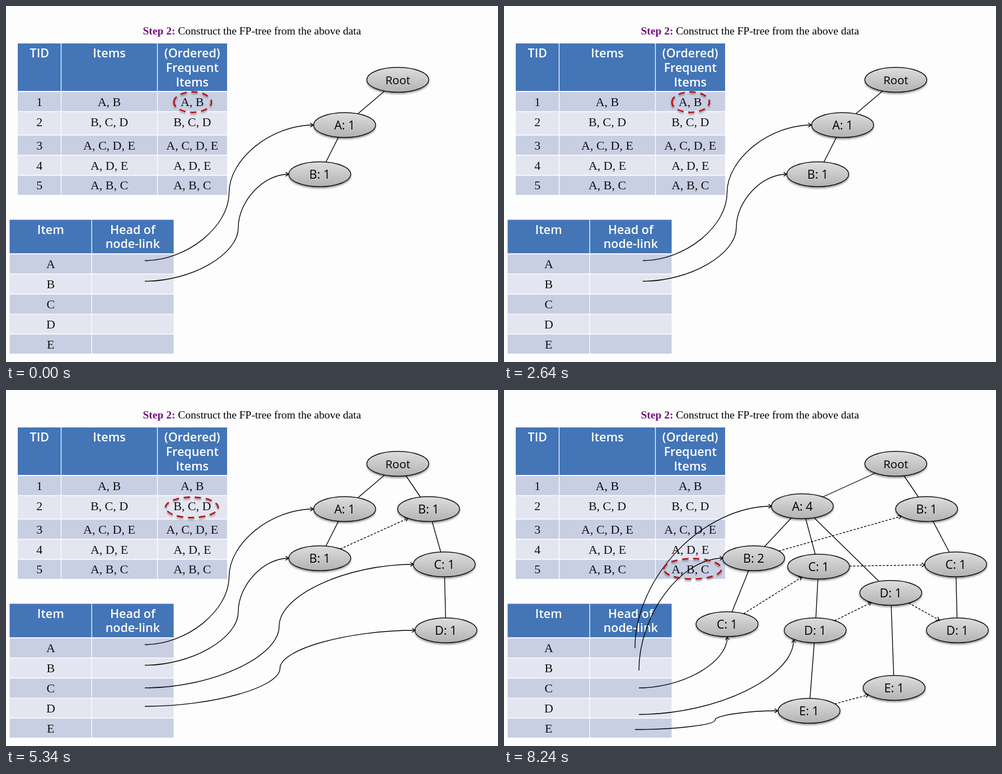
Animation, 879 px wide and 637 px high, one loop 8.34 s. Source, as an HTML page:

```html
<!DOCTYPE html>
<html lang="en">
<head>
<meta charset="utf-8">
<title>FP-tree construction</title>
<style>
  html, body { margin: 0; width: 100%; height: 100%; overflow: hidden; background: #fdfdfd; }
  svg { display: block; width: 100vw; height: 100vh; }
  text { text-anchor: middle; }
  .title { font: 19.5px "Liberation Serif", serif; text-anchor: start; }
  .title tspan { font-weight: bold; fill: #70107c; }
  .cell { font: 22px "Liberation Serif", serif; fill: #111; }
  .head { font: 600 21.5px "Open Sans", sans-serif; fill: #fff; }
  .label { font: 21.5px "Open Sans", sans-serif; }
  .line { fill: none; stroke: #000; stroke-width: 1.35; }
  .dashed { stroke-dasharray: 4 2.6; }
  .node { fill: url(#metal); stroke: #111; stroke-width: 1.4; filter: url(#shadow); }
  .ring { fill: none; stroke: #b81414; stroke-width: 2.8; stroke-dasharray: 11.2 8.4; filter: url(#shadow); }
</style>
</head>
<body>
<svg id="stage" viewBox="0 0 879 637">
  <defs>
    <linearGradient id="metal" x1="0" y1="0" x2="0" y2="1">
      <stop offset="0" stop-color="#dedede"/>
      <stop offset="1" stop-color="#b2b2b2"/>
    </linearGradient>
    <filter id="shadow" x="-20%" y="-30%" width="140%" height="180%">
      <feDropShadow dx="0" dy="2.5" stdDeviation="1.8" flood-color="#000" flood-opacity=".4"/>
    </filter>
  </defs>
  <text class="title" x="244.5" y="51"><tspan>Step 2:</tspan> Construct the FP-tree from the above data</text>
</svg>
<script>
const LOOP = 8340, RX = 55.3, RY = 22.3;
const stage = document.getElementById('stage');

function add(parent, tag, attrs, text) {
  const el = document.createElementNS('http://www.w3.org/2000/svg', tag);
  for (const key in attrs) el.setAttribute(key, attrs[key]);
  if (text) el.textContent = text;
  parent.append(el);
  return el;
}
const line = (g, d, extra = '') => add(g, 'path', { class: 'line ' + extra, d });

// xs: column borders, ys: row borders, heads: header lines per column
function drawTable(xs, ys, heads, rows, centers) {
  const left = xs[0], right = xs[xs.length - 1], bottom = ys[ys.length - 1];
  const mid = c => (xs[c] + xs[c + 1]) / 2;
  ys.slice(0, -1).forEach((y, i) => add(stage, 'rect', {
    x: left, y, width: right - left, height: ys[i + 1] - y,
    fill: i === 0 ? '#4375b7' : i % 2 ? '#c8cfe3' : '#e3e6f0'
  }));
  const rule = (d, w) => add(stage, 'path', { d, stroke: '#fff', 'stroke-width': w });
  ys.slice(1, -1).forEach((y, i) => rule(`M${left} ${y}H${right}`, i ? 1.3 : 1.8));
  xs.slice(1, -1).forEach(x => rule(`M${x} ${ys[0]}V${bottom}`, 1.3));
  heads.forEach((lines, c) => lines.forEach((s, i) =>
    add(stage, 'text', { class: 'head', x: mid(c), y: ys[0] + 25.3 + i * 25.6 }, s)));
  rows.forEach((row, r) => row.forEach((s, c) =>
    add(stage, 'text', { class: 'cell', x: mid(c), y: centers[r] + 7.5 }, s)));
}

drawTable([21, 98.5, 270.5, 395], [67, 153, 189, 231, 267, 303, 338],
  [['TID'], ['Items'], ['(Ordered)', 'Frequent', 'Items']],
  ['A, B', 'B, C, D', 'A, C, D, E', 'A, D, E', 'A, B, C'].map((s, i) => [String(i + 1), s, s]),
  [171, 207, 249, 285, 320.5]);
drawTable([6.5, 153.2, 299.5], [382.5, 443.5, 479.5, 515.5, 551.3, 587, 622],
  [['Item'], ['Head of', 'node-link']],
  [...'ABCDE'].map(s => [s]), [461.5, 497.5, 533.5, 569, 605]);

const root = ['Root', 700, 132];
const B2 = ['B: 1', 755, 213, 'root'];
const C2 = ['C: 1', 807, 312, 'b2'], lastD = ['D: 1', 810, 430, 'c2'];
const headA = [248, 455.5, 549, 213], headB = [248, 492.5, 505, 301, 415];
const wideTree = {
  root, a: ['A: 3', 533, 208, 'root'], b: ['B: 1', 446, 301, 'a'],
  c: ['C: 1', 562, 316, 'a'], d: ['D: 1', 556, 430, 'c'], e: ['E: 1', 545, 574, 'd'],
  d2: ['D: 1', 691, 363, 'a'], e2: ['E: 1', 697, 533, 'd2'],
  b2: B2, c2: C2, d3: lastD
};
const wideLinks = ['b b2', 'c c2', 'd d2', 'd2 d3', 'e e2'];
const wideHeads = [[234, 462, 478, 208, 'rise'], [241, 502, 391, 301, 'rise'],
  [241, 580.5, 517.5, 447, 'turn'], [234, 607.5, 489, 574, 377]];

// nodes: label, x, y, parent; heads: start, end, then bend x or curve kind; ring: cx, cy, rx
const scenes = [
  {
    start: 0, ring: [333.5, 172, 33.5],
    nodes: { root, a: ['A: 1', 605, 213, 'root'], b: ['B: 1', 560.5, 301, 'a'] },
    links: [], heads: [headA, headB]
  },
  {
    start: 4060, ring: [332, 210, 47],
    nodes: {
      root, a: ['A: 1', 605, 213, 'root'], b: ['B: 1', 560.5, 301, 'a'], b2: B2,
      c2: ['C: 1', 783, 312, 'b2'], d2: ['D: 1', 786, 430, 'c2']
    },
    links: ['b b2'],
    heads: [headA, headB, [248, 533, 728, 312], [248, 566, 731, 430]]
  },
  {
    start: 5620, ring: [330, 247, 58.5],
    nodes: {
      root, a: ['A: 2', 605, 213, 'root'], b: ['B: 1', 494.5, 301, 'a'],
      c: ['C: 1', 641, 294, 'a'], d: ['D: 1', 644, 412, 'c'], e: ['E: 1', 648, 542, 'd'],
      b2: B2, c2: C2, d2: lastD
    },
    links: ['b b2', 'c c2', 'd d2'],
    heads: [[...headA, 382], [234, 492.5, 439, 301, 381], [241, 533, 752, 312, 570],
      [241, 580.5, 755, 430, 534], [241, 610, 593, 542, 493]]
  },
  {
    start: 7100, ring: [333, 285, 47],
    nodes: wideTree, links: wideLinks,
    heads: [...wideHeads, [241, 533, 507, 316]]
  },
  {
    start: 7860, ring: [337, 320, 51.5],
    nodes: {
      ...wideTree, a: ['A: 4', 533, 208, 'root'], b: ['B: 2', 446, 301, 'a'],
      c1: ['C: 1', 398.5, 419, 'b']
    },
    links: [...wideLinks, 'c1 c'],
    heads: [...wideHeads, [241, 533, 399, 442, 'turn']]
  }
];

function arrowTip(g, x, y, angle) {
  add(g, 'path', {
    class: 'line', d: 'M-5.5 -3.6L0 0L-5.5 3.6',
    transform: `translate(${x} ${y}) rotate(${angle})`
  });
}

function drawHead(g, [x0, y0, x1, y1, bend = (x0 + x1) / 2]) {
  const mx = (x0 + x1) / 2, my = (y0 + y1) / 2;
  const curve = bend === 'rise' ? `C${x0} ${my} ${mx} ${y1} ${x1} ${y1}`
    : bend === 'turn' ? `C${mx} ${y0} ${x1} ${my} ${x1} ${y1}`
    : `C${(x0 + bend) / 2} ${y0} ${bend} ${(y0 + my) / 2} ${bend} ${my}` +
      `S${(x1 + bend) / 2} ${y1} ${x1} ${y1}`.replace('S', `C${bend} ${(y1 + my) / 2} `);
  line(g, `M${x0} ${y0}${curve}`);
  arrowTip(g, x1, y1, bend === 'turn' ? -90 : 0);
}

// Dashed arrow along the line of centres, from rim to rim
function drawLink(g, [, x0, y0], [, x1, y1]) {
  const dx = x1 - x0, dy = y1 - y0, k = 1 / Math.hypot(dx / RX, dy / RY);
  const ex = x1 - dx * k, ey = y1 - dy * k;
  line(g, `M${x0 + dx * k} ${y0 + dy * k}L${ex} ${ey}`, 'dashed');
  arrowTip(g, ex, ey, Math.atan2(dy, dx) * 180 / Math.PI);
}

function drawScene({ ring: [cx, cy, rx], nodes, links, heads }) {
  const g = add(stage, 'g', { display: 'none' });
  const all = Object.values(nodes);
  for (const [, x, y, parent] of all) {
    if (parent) line(g, `M${nodes[parent][1]} ${nodes[parent][2]}L${x} ${y}`);
  }
  for (const [label, x, y] of all) {
    add(g, 'ellipse', { class: 'node', cx: x, cy: y, rx: RX, ry: RY });
    const text = add(g, 'text', { class: 'label', x, y: y + 8 }, label);
    if (label === 'Root') text.style.fontSize = '20.5px';
  }
  for (const link of links) drawLink(g, ...link.split(' ').map(id => nodes[id]));
  heads.forEach(head => drawHead(g, head));
  add(g, 'path', {
    class: 'ring',
    d: `M${cx - rx} ${cy}a${rx} 18.3 0 0 1 ${2 * rx} 0a${rx} 18.3 0 0 1 ${-2 * rx} 0`
  });
  return g;
}

const groups = scenes.map(drawScene);
let shown = -1;

function render(time) {
  const t = time % LOOP;
  const current = scenes.filter(s => s.start <= t).length - 1;
  if (current === shown) return;
  groups.forEach((g, i) => g.setAttribute('display', i === current ? 'inline' : 'none'));
  shown = current;
}

const began = performance.now();
function tick() {
  render(performance.now() - began);
  requestAnimationFrame(tick);
}
tick();
</script>
</body>
</html>
```
